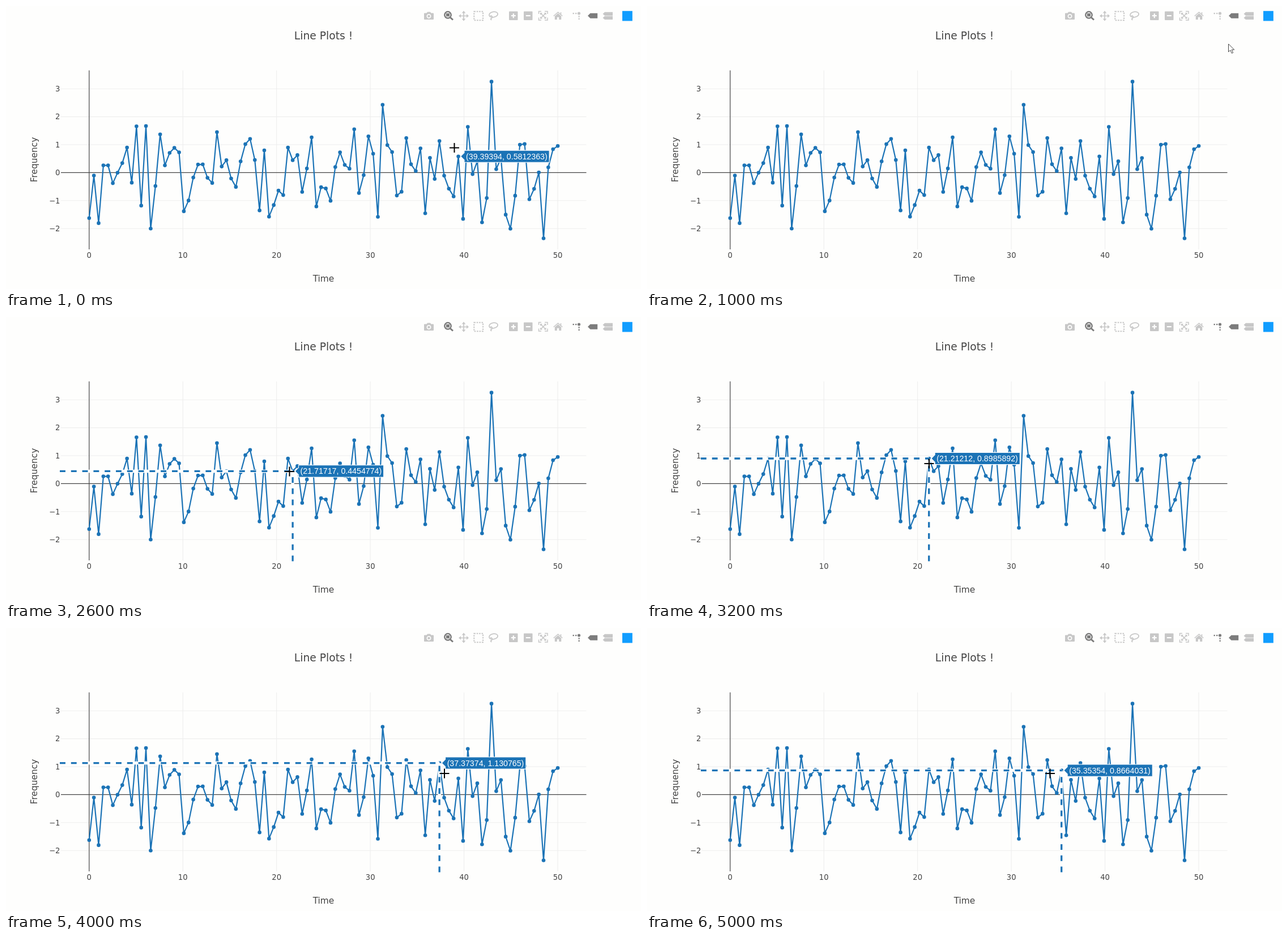
An HTML page for the animation above (5.2 s loop, 1121 by 500 pixels).

```html
<!DOCTYPE html>
<html lang="en">
<head>
<meta charset="utf-8">
<title>Line Plots</title>
<style>
  html, body { margin: 0; width: 100%; height: 100%; overflow: hidden; background: #fefefd; }
  svg { display: block; width: 100%; height: 100%; }
  text { font-family: "DejaVu Sans", Verdana, sans-serif; fill: #444; }
  .tick { font-size: 13.2px; }
  .axis { font-size: 15.4px; }
  .tip { font: 14.2px "Liberation Sans", Arial, sans-serif; fill: #fff; }
  .icon { fill: #c7c7c7; color: #c7c7c7; }
  .icon.on { fill: #7c7c7c; color: #7c7c7c; }
  .line { fill: none; stroke: currentColor; }
</style>
</head>
<body>
<svg viewBox="0 0 1121 500">
  <g id="modebar">
    <path class="icon" fill-rule="evenodd" d="M739 12.5h3.5l1.5-2h5l1.5 2h3.5q1 0 1 1v9.500q0 1-1 1h-15q-1 0-1-1v-9.500q0-1 1-1ZM746.500 14a4 4 0 1 0 .01 0ZM746.500 15.700a2.300 2.300 0 1 1-.01 0Z"/>
    <g class="icon on">
      <circle class="line" cx="780" cy="15.800" r="5.700" stroke-width="2.500"/>
      <path d="M777 13h6v5.500h-6Z"/>
      <path class="line" d="M784.500 20.500l4.500 4" stroke-width="3"/>
    </g>
    <g class="icon">
      <path class="line" d="M808 11v13M801.500 17.500h13" stroke-width="1.700"/>
      <path d="M808 8.500l3.300 4h-6.600ZM808 26.500l3.300-4h-6.600ZM799 17.500l4-3.300v6.600ZM817 17.500l-4-3.300v6.600Z"/>
    </g>
    <rect class="icon line" x="826.300" y="9.800" width="15.800" height="15.400" fill="none" style="fill:none" stroke-width="2" stroke-dasharray="2.600 1.800"/>
    <g class="icon">
      <ellipse class="line" cx="860.500" cy="15" rx="7.700" ry="4.800" stroke-width="1.800" transform="rotate(-10 860.500 15)"/>
      <path class="line" d="M855 17q4 0 3 3t-2 2.500 1 2.500" stroke-width="1.700"/>
    </g>
    <g class="icon">
      <rect x="888" y="9.500" width="15.500" height="15.500" rx="1"/>
      <rect x="914" y="9.500" width="15.500" height="15.500" rx="1"/>
      <path d="M895.800 13.200v8M891.800 17.200h8M917.800 17.200h8" stroke="#fefefd" stroke-width="2.200"/>
    </g>
    <g class="icon">
      <path class="line" d="M940.500 14v-4.500h4.500M951 9.500h5v4.500M956 20.500v4.500h-5M945 25h-4.500v-4.500" stroke-width="1.500"/>
      <path class="line" d="M944 13l8.500 8.500M952.500 13l-8.500 8.500" stroke-width="1.700"/>
      <path d="M943 12h4l-4 4ZM953.500 12h-4l4 4ZM943 22.500h4l-4-4ZM953.500 22.500h-4l4-4Z"/>
    </g>
    <g class="icon">
      <path d="M968.800 18l5.700-5 5.700 5v6h-4v-4.300h-3.400v4.300h-4Z"/>
      <path class="line" d="M966.700 17.700l7.800-6.700 7.800 6.700M979.500 11v4" stroke-width="1.500"/>
    </g>
    <g class="icon" id="spikeButton">
      <circle cx="1011.500" cy="13" r="2.600"/>
      <path d="M1000.500 12h2.400v2.200h-2.400ZM1005 12h2.400v2.200h-2.400ZM1010.500 17.300h2.200v2.400h-2.200ZM1010.500 21.500h2.200v2.400h-2.200Z"/>
    </g>
    <path class="icon on" d="M1027 17.300l4.500-4.500h12.700v9h-12.700Z"/>
    <path class="icon" d="M1053.500 14l3.500-3.200h14v6.200h-14ZM1053.500 21l3.500-3.200h14v6.200h-14Z"/>
    <rect x="1088" y="8.800" width="17.800" height="17.600" fill="#119dff"/>
  </g>
  <text x="560.500" y="58.500" font-size="18.700" text-anchor="middle">Line Plots !</text>
  <text class="axis" x="560.500" y="487" text-anchor="middle">Time</text>
  <text class="axis" text-anchor="middle" transform="translate(55 271.500) rotate(-90)">Frequency</text>
  <g id="plot"></g>
  <g id="hover">
    <g id="spikes" fill="none">
      <path class="spike" stroke="#fefefd" stroke-width="5.500"/>
      <path class="spike" stroke="#1b73b6" stroke-width="3.300" stroke-dasharray="9.900"/>
    </g>
    <path id="tipBox" fill="#1b73b6" stroke="#fff" stroke-width="1.100"/>
    <text id="tipText" class="tip"></text>
  </g>
  <path id="cross" d="M-8.500 0h17M0-8.500v17" stroke="#000" stroke-width="2"/>
  <path id="arrow" d="M.5.5v14l3.300-3 2.500 5.500 2.300-1-2.400-5.300h4.500Z" fill="#fff" stroke="#444"/>
</svg>
<script>
const BLUE = '#1b73b6', STEP = 200, LOOP = 5200;
const byId = id => document.getElementById(id);

const values = [
  -1.625, -.105, -1.807, .259, .259, -.379, -.004, .34, .898, -.359,
  1.657, -1.179, 1.667, -2, -.48, 1.37, .259, .705, .887, .725,
  -1.382, -.997, -.176, .29, .296, -.186, -.369, 1.451, .219, .446,
  -.211, -.511, .401, 1.019, 1.208, .452, -1.351, .796, -1.574, -1.159,
  -.642, -.804, .8985892, .4454774, .628, -.689, .148, 1.262, -1.21, -.521,
  -.567, -1.007, .199, .7253816, .276, .142, 1.552, -.729, -.089, 1.297,
  .6748213, -1.58, 2.427, .985, .735, -.819, -.683, 1.238457, .3, .057,
  .8664031, -1.453, .5268374, -.227, 1.130765, -.109, -.575, -.851, .5812363, -1.655,
  1.637, -.055, .405, -1.777, -.91, 3.254, .122, .5232746, -1.503, -2.006,
  -.825, 1.001, 1.025, -.952, -.581, .006, -2.35, .188, .8367218, .952
];
const timeOf = i => i * 50 / 99;
const px = time => 146.8 + time * 16.545;
const py = value => 294.4 - value * 49.4;

function drawPlot() {
  const path = (d, color, width) =>
    `<path d="${d}" fill="none" stroke="${color}" stroke-width="${width}" stroke-linejoin="round"/>`;
  const label = (x, y, anchor, s) =>
    `<text class="tick" x="${x}" y="${y}" text-anchor="${anchor}">${String(s).replace('-', '\u2212')}</text>`;
  const vertical = t => `M${px(t)} 113.800V430`;
  const horizontal = v => `M97 ${py(v)}H1024.500`;
  let grid = '', labels = '', dots = '';
  for (let t = 0; t <= 50; t += 10) {
    if (t) grid += vertical(t);
    labels += label(px(t), 444.5, 'middle', t);
  }
  for (let v = -2; v <= 3; v++) {
    if (v) grid += horizontal(v);
    labels += label(95.5, py(v) + 4.7, 'end', v);
  }
  const points = values.map((v, i) => [px(timeOf(i)), py(v)]);
  for (const [x, y] of points) dots += `<circle cx="${x}" cy="${y}" r="3.300" fill="${BLUE}"/>`;
  byId('plot').innerHTML = path(grid, '#eee', 1.1) +
    path(vertical(0) + horizontal(0), '#444', 1.2) +
    path('M' + points.join('L'), BLUE, 2.2) + dots + labels;
}

// Pointer route: time, x, y
const route = [
  [0, 791.5, 250.5], [200, 748, 262], [400, 741, 272], [600, 698, 277],
  [1000, 1026, 66.5], [1200, 1009, 21], [1600, 1009, 21], [1800, 911, 136.5],
  [2000, 700, 240], [2600, 500.5, 273], [3200, 498, 259], [4000, 774, 257],
  [4400, 968, 265], [4600, 824, 265], [5000, 711.5, 257], [LOOP, 711.5, 257]
];
// Hovered point from each time on; -1 means none
const hovered = [
  [0, 78], [200, 72], [800, -1], [2000, 67], [2200, 60], [2400, 53], [2600, 43],
  [3000, 42], [3400, 53], [3600, 60], [3800, 67], [4000, 74], [4200, 87],
  [4400, 98], [4800, 72], [5000, 70]
];

function pointerAt(t) {
  const k = route.findIndex(p => p[0] > t);
  const [t0, x0, y0] = route[k - 1], [t1, x1, y1] = route[k];
  const f = (t - t0) / (t1 - t0);
  return [x0 + (x1 - x0) * f, y0 + (y1 - y0) * f];
}

const show = (el, visible) => el.setAttribute('visibility', visible ? 'inherit' : 'hidden');

function drawHover(i, spikesOn) {
  show(byId('hover'), i >= 0);
  if (i < 0) return;
  const x = px(timeOf(i)), y = py(values[i]);
  show(byId('spikes'), spikesOn);
  for (const el of document.querySelectorAll('.spike'))
    el.setAttribute('d', `M95 ${y}H${x}M${x} 431.500V${y}`);

  const text = byId('tipText');
  text.textContent = `(${timeOf(i).toPrecision(7)}, ${values[i].toPrecision(7)})`;
  const textWidth = text.getComputedTextLength(), width = textWidth + 6.6;
  const side = x + 10.5 + width > 1121 ? -1 : 1;
  byId('tipBox').setAttribute('d',
    `M${x + side * 4} ${y}l${side * 6.4} 6.400v4.200h${side * width}v-21.200h${-side * width}v4.200Z`);
  text.setAttribute('x', side > 0 ? x + 13.5 : x - 13.5 - textWidth);
  text.setAttribute('y', y + 5);
}

function render(now) {
  const t = Math.floor(now % LOOP / STEP) * STEP;
  const [x, y] = pointerAt(t);
  const overPlot = y > 113;
  for (const id of ['cross', 'arrow']) {
    byId(id).setAttribute('transform', `translate(${x} ${y})`);
    show(byId(id), (id === 'cross') === overPlot);
  }
  const spikesOn = t >= 1200;
  byId('spikeButton').classList.toggle('on', spikesOn);
  drawHover(hovered.findLast(h => h[0] <= t)[1], spikesOn);
}

drawPlot();
const start = performance.now();
function frame() {
  render(performance.now() - start);
  requestAnimationFrame(frame);
}
frame();
</script>
</body>
</html>
```
